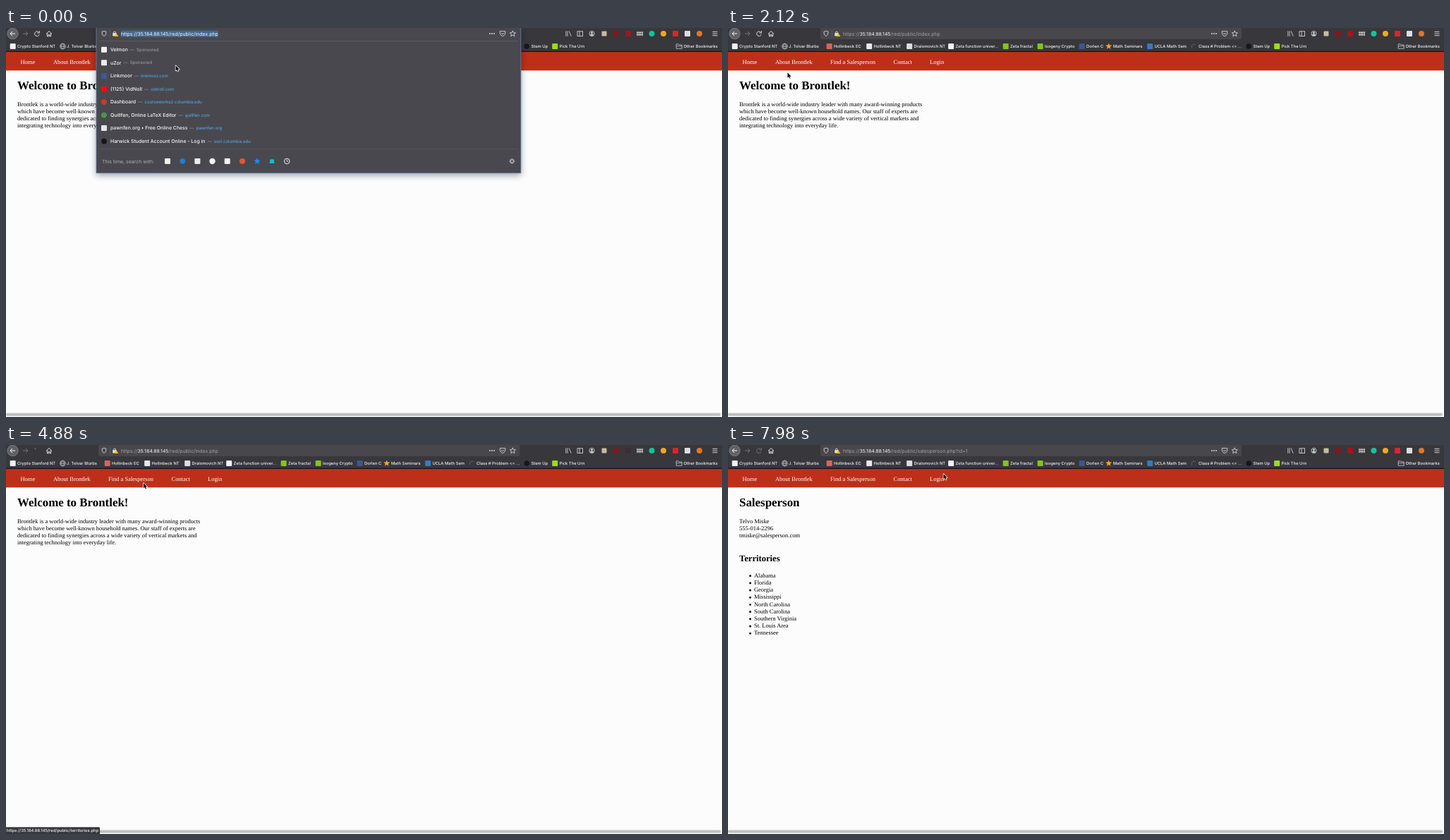
An HTML page with a canvas that plays this animation: 1015x552 px, repeating every 8000 ms.

```html
<!DOCTYPE html>
<html lang="en">
<head>
<meta charset="utf-8">
<title>Browser walk-through</title>
<style>
html, body { margin: 0; width: 100%; height: 100%; overflow: hidden; background: #fcfcfd; }
canvas { display: block; }
</style>
</head>
<body>
<canvas id="stage" width="1015" height="552"></canvas>
<script>
const c = document.getElementById('stage').getContext('2d');
const LOOP = 8000;
const SANS = 'Inter, "Open Sans", sans-serif';
const SERIF = '"Liberation Serif", "Noto Serif", serif';
const BODY = 8.46;
const LIGHT = '#e6e6e8', BAR = '#38373c', PANEL = '#49484f';
const SITE = '35.184.88.145';

// Page switches and status label times
const CLOSE = 850, HOVER = 3420, CLICK = 4800, LIST = 5200, HOVER2 = 6780, PERSON = 7600;

function rect(x, y, w, h, fill) {
  c.fillStyle = fill;
  c.fillRect(x, y, w, h);
}
function round(x, y, w, h, r, fill) {
  c.beginPath();
  c.roundRect(x, y, w, h, r);
  c.fillStyle = fill;
  c.fill();
}
function dot(x, y, r, fill) {
  c.beginPath();
  c.arc(x, y, r, 0, 7);
  c.fillStyle = fill;
  c.fill();
}
function ring(x, y, r, color, w = 0.9, from = 0, to = Math.PI * 2) {
  c.beginPath();
  c.arc(x, y, r, from, to);
  c.strokeStyle = color;
  c.lineWidth = w;
  c.stroke();
}
function square(x, y, fill, s = 8) {
  round(x - s / 2, y - s / 2, s, s, 1, fill);
}
function line(color, w, ...p) {
  c.beginPath();
  for (let i = 0; i < p.length; i += 2) c.lineTo(p[i], p[i + 1]);
  c.strokeStyle = color;
  c.lineWidth = w;
  c.stroke();
}
function star(x, y, r) {
  c.beginPath();
  for (let i = 0; i < 10; i++) {
    const a = i * Math.PI / 5 - Math.PI / 2, q = i % 2 ? r * 0.45 : r;
    c.lineTo(x + q * Math.cos(a), y + q * Math.sin(a));
  }
  c.closePath();
}
// Draws text centred on y and returns its right edge
function text(s, x, y, size, color, family = SANS, weight = 400) {
  c.font = `${weight} ${size}px ${family}`;
  c.fillStyle = color;
  c.fillText(s, x, y + size * 0.34);
  return x + c.measureText(s).width;
}
const ui = (s, x, y, size = 6.9, color = LIGHT, weight = 400) => text(s, x, y, size, color, SANS, weight);
const body = (s, x, y, color = '#000') => text(s, x, y, BODY, color, SERIF);
const title = s => text(s, 16, 81, 16.92, '#000', SERIF, 700);
function link(s, x, y) {
  const end = body(s, x, y, '#0000ee');
  rect(x, y + 3.7, end - x, 0.6, '#0000ee');
}

function toolbar(t) {
  rect(0, 0, 1015, 33, BAR);
  rect(0, 32.8, 1015, 1.2, '#151417');

  dot(9.5, 8, 8, '#626166');
  ring(9.5, 8, 7.7, '#807f84', 0.7);
  line('#f5f5f6', 1, 13, 8, 6, 8, 9, 5, 6, 8, 9, 11);
  line('#79787d', 1, 24, 8, 31, 8, 28, 5, 31, 8, 28, 11);
  if (t >= CLICK && t < LIST) {
    line('#a5a4a8', 0.8, 40.5, 4.5, 42.5, 6);
  } else {
    const tone = t < CLICK ? LIGHT : '#77767b';
    ring(44, 8.2, 3.2, tone, 1, 0.3, 5.4);
    line(tone, 1, 47.3, 4, 47.3, 7, 44.5, 7);
  }
  line(LIGHT, 1, 57, 8.4, 61, 4.5, 65, 8.4);
  line(LIGHT, 1, 58.4, 7.5, 58.4, 11.8, 60.2, 11.8, 60.2, 9.3, 61.8, 9.3, 61.8, 11.8, 63.6, 11.8, 63.6, 7.5);

  line(LIGHT, 0.8, 793.8, 4.3, 793.8, 11.8);
  line(LIGHT, 0.8, 796, 4.3, 796, 11.8);
  line(LIGHT, 0.8, 798.2, 4.3, 801.2, 11.8);
  c.strokeRect(810, 4.8, 7.6, 6.6);
  line(LIGHT, 0.8, 813, 5, 813, 11.4);
  ring(830.5, 8, 3.6, LIGHT, 0.8);
  dot(830.5, 6.9, 1.3, LIGHT);
  round(828.3, 8.8, 4.4, 2, 1, LIGHT);
  square(848, 8, '#c3bf9d', 7);
  dot(865, 8, 3.8, '#970f18');
  square(882, 8, t >= CLICK && t < LIST ? '#3d2e32' : '#a51518');
  for (let i = 0; i < 4; i++) line(LIGHT, 1, 895 + i * 2.4, 4.8, 895 + i * 2.4, 11.2);
  line(LIGHT, 0.6, 894, 6.5, 903, 6.5);
  line(LIGHT, 0.6, 894, 9.5, 903, 9.5);
  dot(915.5, 8, 4, '#15c39a');
  dot(932, 8, 4, '#f2a51f');
  square(949, 8, '#e5202b');
  square(966, 8, '#dddde0');
  dot(983, 8, 4, '#e27625');
  for (const y of [5.3, 8, 10.7]) line(LIGHT, 0.9, 1001.5, y, 1008.5, y);
}

const BOOKMARKS = [
  [16, 'Crypto Stanford NT', '#f1f1f2'], [86, 'J. Tolvar Blurbs', 'globe'],
  [150, 'Hollinbeck EC', '#d8655a'], [206.5, 'Hollinbeck NT', '#e8e9ec'],
  [263.5, 'Dralomovich NT', '#dededa'], [322.5, 'Zeta function univer...', '#f5f5f5'],
  [400, 'Zeta fractal', '#83c41d'], [449, 'Isogeny Crypto', '#83c41d'],
  [508, 'Dorlen C', '#3d568f'], [546, 'Math Seminars', 'star'],
  [604.5, 'UCLA Math Sem', '#3b78bd'], [667, 'Class # Problem <= ...', 'arc'],
  [744.5, 'Stem Up', 'black'], [784.5, 'Pick The Urn', '#9bdc1a'],
  [960.5, 'Other Bookmarks', 'folder']
];
function bookmarks() {
  for (const [x, label, icon] of BOOKMARKS) {
    const ix = x - 6.3, y = 26;
    if (icon === 'globe') {
      ring(ix + 0.7, y, 3.8, LIGHT, 0.7);
      line(LIGHT, 0.6, ix - 3, y, ix + 4.4, y);
      c.beginPath();
      c.ellipse(ix + 0.7, y, 1.7, 3.8, 0, 0, 7);
      c.stroke();
    } else if (icon === 'star') {
      star(ix, y, 4.6);
      c.fillStyle = '#f5a32a';
      c.fill();
    } else if (icon === 'arc') {
      ring(ix, y + 0.5, 3.5, '#74659c', 0.8, 2.6, 5.4);
    } else if (icon === 'black') {
      dot(ix, y, 3.8, '#17171a');
    } else if (icon === 'folder') {
      line(LIGHT, 0.7, ix - 4, 29.2, ix - 4, 22.8, ix - 1, 22.8, ix, 24, ix + 4, 24, ix + 4, 29.2, ix - 4, 29.2);
      line(LIGHT, 0.6, ix - 4, 25.6, ix + 4, 25.6);
    } else square(ix, y, icon);
    ui(label, x, y, 5.82, '#f3f3f4', 500);
  }
}

function address(path, open) {
  if (!open) round(131, -3, 597, 19, 2, '#48474b');
  line(LIGHT, 0.8, 139, 4.3, 142, 5.2, 141.6, 9, 139, 11.8, 136.4, 9, 136, 5.2, 139, 4.3);
  line('#626166', 0.7, 147.5, 3, 147.5, 13);
  round(151.2, 7, 5.5, 4.6, 0.8, '#dddde0');
  ring(154, 6.8, 1.7, '#dddde0', 0.9, Math.PI, Math.PI * 2);
  c.beginPath();
  c.moveTo(156.3, 7);
  c.lineTo(159.3, 12);
  c.lineTo(153.3, 12);
  c.fillStyle = '#ffbf00';
  c.fill();

  const parts = ['https://', SITE, '/red/public/' + path];
  if (open) {
    c.font = `400 6.93px ${SANS}`;
    rect(163, 3.6, c.measureText(parts.join('')).width, 9.2, '#42688f');
  }
  let x = 163;
  parts.forEach((s, i) => x = ui(s, x, 8.3, 6.93, open || i === 1 ? '#fafafa' : '#a3a2a6'));

  for (const i of [-1, 0, 1]) dot(689 + i * 3, 8, 0.9, LIGHT);
  line(LIGHT, 0.8, 700.3, 4.6, 707.7, 4.6, 707.7, 8, 706, 10.6, 704, 11.6, 702, 10.6, 700.3, 8, 700.3, 4.6);
  line(LIGHT, 0.8, 702, 7, 704, 8.8, 706, 7);
  star(718.3, 8.2, 4.3);
  c.strokeStyle = LIGHT;
  c.stroke();
}

const HITS = [
  ['Velmon', '', '#f3f2ed'], ['uZor', '', '#ededf0'],
  ['Linkmoor', 'linkmoor.com', '#3b5998'], ['(1125) VidNoll', 'vidnoll.com', '#f20d0d'],
  ['Dashboard', 'courseworks2.columbia.edu', 'o#c93a2c'],
  ['Quillfen, Online LaTeX Editor', 'quillfen.com', 'o#459a47'],
  ['pawnfen.org • Free Online Chess', 'pawnfen.org', '#e8e8ea'],
  ['Harwick Student Account Online - Log in', 'ssol.columbia.edu', 'o#17171a']
];
const hitY = i => 30.8 + i * 18.55;

function dropdown(active) {
  c.save();
  c.shadowColor = 'rgba(10,20,40,.4)';
  c.shadowBlur = 9;
  c.shadowOffsetY = 3;
  rect(128, -4, 602, 210, PANEL);
  c.restore();
  line('#6585ad', 0.8, 128, -1, 128, 205.8, 729.8, 205.8, 729.8, -1);
  rect(132, 18, 594, 0.7, '#626168');
  rect(132, 171.5, 594, 0.7, '#5c5b62');
  address('index.php', true);

  HITS.forEach(([name, url, icon], i) => {
    const y = hitY(i);
    if (i === active) rect(132, y - 7.4, 594, 15, '#5a5a5d');
    if (icon[0] === 'o') dot(139, y, 3.9, icon.slice(1));
    else square(139, y, icon);
    let x = ui(name, 148, y, 6.93, '#f8f8f9', 500);
    x = ui('—', x + 3, y, 6.2, '#a9a9ad');
    ui(url || 'Sponsored', x + 3, y, 6.1, url ? '#58b2ee' : '#a3a3a8');
  });

  const y = 189;
  ui('This time, search with:', 136, y + 0.5, 6.98, '#aeaeb2');
  square(229, y, '#f3f2ed');
  dot(250.3, y, 3.8, '#1683d8');
  square(271.4, y, '#ededf0');
  dot(292.5, y, 4.2, '#f5f5f5');
  square(313.7, y, '#f5f5f5');
  dot(335, y, 4.1, '#de5833');
  star(356, y, 4.8);
  c.fillStyle = '#168bff';
  c.fill();
  c.beginPath();
  for (const [dx, dy] of [[-2.8, -2.8], [2.8, -2.8], [3, 1.8], [4.2, 3], [-4.2, 3], [-3, 1.8]]) c.lineTo(377 + dx, y + dy);
  c.fillStyle = '#10bfd0';
  c.fill();
  ring(398.3, y, 3.8, '#f2f2f3', 1);
  line('#f2f2f3', 0.8, 398.3, 186.5, 398.3, 189.2, 400.3, 189.2);
  ring(717.3, y, 2.2, LIGHT, 0.9);
  for (let i = 0; i < 8; i++) {
    const u = Math.cos(i * Math.PI / 4), v = Math.sin(i * Math.PI / 4);
    line(LIGHT, 0.9, 717.3 + u * 2.4, y + v * 2.4, 717.3 + u * 4, y + v * 4);
  }
}

function nav(w) {
  rect(0, 34, w, 26.3, '#be2f19');
  [[20.5, 'Home'], [67, 'About Brontlek'], [145, 'Find a Salesperson'], [234.5, 'Contact'], [286, 'Login']]
    .forEach(([x, s]) => body(s, x, 47.7, '#fff'));
}

function homePage() {
  title('Welcome to Brontlek!');
  ['Brontlek is a world-wide industry leader with many award-winning products',
    'which have become well-known household names. Our staff of experts are',
    'dedicated to finding synergies across a wide variety of vertical markets and',
    'integrating technology into everyday life.'].forEach((s, i) => body(s, 16, 108 + i * 10.2));
}

const STAFF = ['Telvo Miske', 'Nolvet Dalviston', 'Ilna Dorling', 'Eldritha Ulmsen', 'Henny Cordivo', 'Darlena Pinstoley'];
const STATES = [
  ['Alabama (AL)', 0], ['Alaska (AK)', 1], ['Arizona (AZ)', 2], ['Arkansas (AR)', 3],
  ['California (CA)', 'Northern California', 1, 'Southern California', 4],
  ['Colorado (CO)', 2], ['Connecticut (CT)', 5], ['Delaware (DE)', 5], ['Florida (FL)', 0],
  ['Georgia (GA)', 0], ['Hawaii (HI)', 2], ['Idaho (ID)', 2], ['Illinois (IL)', 'Chicago Metro', 4]
];
function listPage() {
  title('Find a Salesperson');
  body('Use the list below to find a salesperson nearby. We are ready to serve you!', 16, 108);
  text('UNITED STATES', 16, 126.6, BODY, '#000', SERIF, 700);
  let y = 145.2;
  for (const [state, ...rows] of STATES) {
    body(state, 16, y);
    rows.forEach((row, i) => {
      y += 10.19;
      if (typeof row === 'string' || i === 0) rect(30.2, y - 0.3, 2.7, 2.7, '#000');
      if (typeof row === 'string') body(row, 37, y);
      else link(STAFF[row], 37, y);
    });
    y += 18.62;
  }
}

function personPage() {
  title('Salesperson');
  [STAFF[0], '555-014-2296', 'tmiske@salesperson.com'].forEach((s, i) => body(s, 16, 108 + i * 10.2));
  text('Territories', 16, 161, 12.6, '#000', SERIF, 700);
  ['Alabama', 'Florida', 'Georgia', 'Mississippi', 'North Carolina', 'South Carolina',
    'Southern Virginia', 'St. Louis Area', 'Tennessee'].forEach((s, i) => {
    const y = 185 + i * 10.2;
    dot(31.5, y + 0.8, 1.45, '#000');
    body(s, 37, y);
  });
}

function scrollbars(tall) {
  const w = tall ? 1007 : 1015;
  rect(0, 545.3, 1015, 6.7, '#f7f7f8');
  round(0, 546.4, w - 2, 4, 2, '#bfbfc1');
  if (tall) {
    rect(1007.3, 34, 7.7, 511.5, '#f7f7f8');
    rect(1007, 34, 0.6, 511.5, '#e4e4e6');
    round(1009, 35.5, 4.3, 126, 2, '#bfbfc1');
  }
}

function status(path) {
  const s = `https://${SITE}/red/public/${path}`;
  c.font = `500 5.82px ${SANS}`;
  const w = c.measureText(s).width;
  round(-2, 542.3, w + 5, 12, 1.5, '#38373c');
  ui(s, 1, 547.5, 5.82, '#f5f5f6', 500);
}

const PATH = [
  [0, 241, 53], [180, 165, 97], [280, 120, 127], [400, 83, 170], [760, 40, 207], [1020, 40, 207],
  [1560, 30, 66], [1660, 30, 66], [2400, 110, 62], [2500, 112, 62], [3140, 198, 48], [4680, 198, 48],
  [4880, 195, 54], [5020, 192, 58], [5720, 62, 140], [6140, 54, 151], [6680, 57, 154],
  [7580, 57, 154], [7940, 305.5, 41], [8000, 305.5, 41]
];
function cursorAt(t) {
  const i = Math.max(1, PATH.findIndex(p => p[0] > t));
  const [t0, x0, y0] = PATH[i - 1], [t1, x1, y1] = PATH[i];
  const u = (t - t0) / (t1 - t0);
  const k = t < 400 ? u : u * u * (3 - 2 * u);
  return [x0 + (x1 - x0) * k, y0 + (y1 - y0) * k];
}
function cursorShape(t) {
  if ((t > 3050 && t < 4840) || (t > 6680 && t < 7640)) return 'hand';
  return t > 5760 && t <= 6680 ? 'beam' : 'arrow';
}
const ARROW = new Path2D('M0 0V7.3L1.7 5.8L2.9 8.4L4 7.9L2.9 5.4H5.2Z');
const HAND = new Path2D('M0 .5Q.7 -.2 1.3 .6V3.2Q2 2.7 2.5 3.4Q3.2 3 3.6 3.7Q4.7 3.6 4.6 4.8L4.2 7.2L3.6 9H.4L-1.7 5.8Q-2.2 4.6 -1 4.7L0 5.8Z');
function cursor(t) {
  const [x, y] = cursorAt(t), shape = cursorShape(t);
  if (shape === 'beam') {
    line('#222', 0.7, x - 1.4, y - 4, x, y - 3.3, x + 1.4, y - 4);
    line('#222', 0.7, x, y - 3.3, x, y + 3.6);
    line('#222', 0.7, x - 1.4, y + 4.3, x, y + 3.6, x + 1.4, y + 4.3);
    return;
  }
  const hand = shape === 'hand', p = hand ? HAND : ARROW;
  c.save();
  c.translate(x, y);
  c.lineJoin = 'round';
  c.lineWidth = hand ? 0.9 : 1.5;
  c.strokeStyle = hand ? '#000' : '#fff';
  c.fillStyle = hand ? '#fff' : '#000';
  c.stroke(p);
  c.fill(p);
  c.restore();
}

function activeHit(t) {
  if (t < 30) return -1;
  const y = cursorAt(Math.min(t, 260))[1];
  return Math.min(5, Math.round((y - hitY(0)) / 18.55));
}

function draw(t) {
  c.textRendering = 'geometricPrecision';
  const onList = t >= LIST && t < PERSON;
  rect(0, 0, 1015, 552, '#fcfcfd');
  (t < LIST ? homePage : onList ? listPage : personPage)();
  nav(onList ? 1007 : 1015);
  scrollbars(onList);
  toolbar(t);
  bookmarks();
  if (t < CLOSE) dropdown(activeHit(t));
  else address(t < LIST ? 'index.php' : onList ? 'territories.php' : 'salesperson.php?id=1', false);
  if (t >= HOVER && t < LIST) status('territories.php');
  if (t >= HOVER2 && t < PERSON) status('salesperson.php?id=1');
  cursor(t);
}

const start = performance.now();
function tick() {
  draw((performance.now() - start) % LOOP);
  requestAnimationFrame(tick);
}
tick();
</script>
</body>
</html>
```
